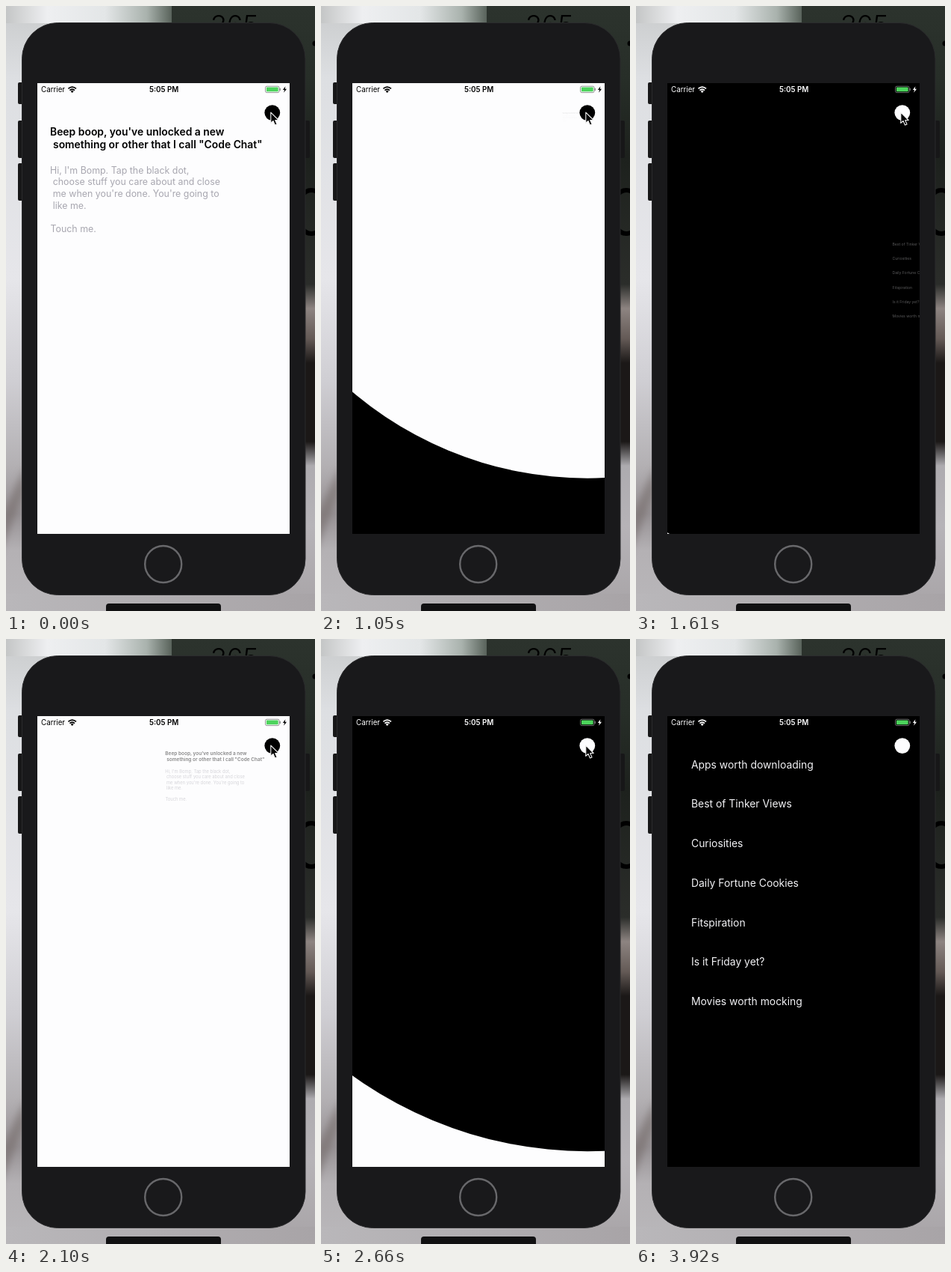
An HTML page that plays this animation: 414 px wide and 808 px high, repeating every 3.99 s.

```html
<!DOCTYPE html>
<html lang="en">
<head>
<meta charset="utf-8">
<title>Menu reveal</title>
<style>
  html, body { margin: 0; width: 100%; height: 100%; overflow: hidden; background: #000; }
  svg { display: block; width: 414px; height: 808px; font-family: Inter, "Open Sans", sans-serif; }
  text { white-space: pre; }
  .title { font-size: 13.9px; font-weight: 600; fill: #000; }
  .body { font-size: 12.4px; fill: #a8a7b0; }
  .row { font-size: 13.9px; fill: #f2f2f5; }
  .status { font-size: 9.8px; fill: currentColor; stroke: none; }
</style>
</head>
<body>
<svg viewBox="0 0 414 808" xmlns="http://www.w3.org/2000/svg">
  <defs>
    <linearGradient id="wallL" x2="0" y2="1">
      <stop offset="0" stop-color="#c9cbcc"/>
      <stop offset=".12" stop-color="#dddfe2"/>
      <stop offset=".45" stop-color="#e6e6ea"/>
      <stop offset=".62" stop-color="#cfced3"/>
      <stop offset=".76" stop-color="#b3b0b3"/>
      <stop offset=".84" stop-color="#979295"/>
      <stop offset=".9" stop-color="#b4b1b4"/>
      <stop offset="1" stop-color="#b9b7ba"/>
    </linearGradient>
    <linearGradient id="wallR" x2="0" y2="1">
      <stop offset="0" stop-color="#2c332d"/>
      <stop offset=".12" stop-color="#272e28"/>
      <stop offset=".25" stop-color="#1d211d"/>
      <stop offset=".46" stop-color="#2b2d2a"/>
      <stop offset=".5" stop-color="#8d8481"/>
      <stop offset=".55" stop-color="#645a56"/>
      <stop offset=".59" stop-color="#1b1817"/>
      <stop offset=".72" stop-color="#1b1817"/>
      <stop offset=".76" stop-color="#adabaf"/>
      <stop offset=".86" stop-color="#b6b3b7"/>
      <stop offset="1" stop-color="#a8a4a7"/>
    </linearGradient>
    <linearGradient id="glow">
      <stop offset="0" stop-color="#c4c6c6"/>
      <stop offset=".25" stop-color="#eeeff1"/>
      <stop offset=".6" stop-color="#e3e6e7"/>
      <stop offset=".85" stop-color="#a9b2ad"/>
      <stop offset="1" stop-color="#59635b"/>
    </linearGradient>
    <linearGradient id="floor">
      <stop offset="0" stop-color="#b9b7ba"/>
      <stop offset="1" stop-color="#a8a4a7"/>
    </linearGradient>
    <filter id="soft"><feGaussianBlur stdDeviation="5"/></filter>
    <clipPath id="glass"><rect x="42" y="103" width="338" height="602"/></clipPath>
    <clipPath id="hole"><circle id="ring" cx="357" cy="143" r="0"/></clipPath>
  </defs>

  <rect width="230" height="808" fill="url(#wallL)"/>
  <rect x="222" width="192" height="808" fill="url(#wallR)"/>
  <rect width="222" height="23" fill="url(#glow)"/>
  <rect y="785" width="414" height="23" fill="url(#floor)"/>
  <path d="M-10 690 L25 615 V650 L-10 735Z" fill="#756c6b" opacity=".6" filter="url(#soft)"/>
  <text x="274" y="38" font-size="36" font-weight="300">365</text>
  <circle cx="414" cy="50" r="3.5"/>
  <ellipse cx="409" cy="275" rx="19" ry="29" fill="none" stroke="#000" stroke-width="6"/>
  <rect x="134" y="798" width="154" height="20" rx="4" fill="#111112"/>

  <g fill="#171718">
    <rect x="16" y="102" width="8" height="29" rx="2"/>
    <rect x="16" y="153" width="8" height="50" rx="2"/>
    <rect x="16" y="210" width="8" height="50" rx="2"/>
    <rect x="399" y="153" width="8" height="50" rx="2"/>
    <rect x="21.5" y="22.5" width="379.5" height="764" rx="48" fill="#19191b" stroke="#2b2b2d"/>
  </g>
  <circle cx="210.7" cy="745.5" r="24.5" fill="none" stroke="#68686b" stroke-width="2.4"/>

  <g id="screen" clip-path="url(#glass)">
    <g id="page"><rect x="42" y="103" width="338" height="602" fill="#fdfdfe"/><g></g></g>
    <g id="menu"><rect x="42" y="103" width="338" height="602"/><g></g></g>
  </g>

  <g id="bar" fill="none" stroke="currentColor">
    <text class="status" x="47" y="115">Carrier</text>
    <text class="status" x="192" y="115" font-weight="600">5:05 PM</text>
    <path d="M83.4 110.4 Q88.7 105.8 94 110.4 M85.4 112.7 Q88.7 109.8 92 112.7" stroke-width="1.7"/>
    <path d="M88.7 116 l-2 -2.1 q2 -1.6 4 0z" fill="currentColor" stroke="none"/>
    <rect x="347.5" y="107.2" width="18.6" height="8.4" rx="2" stroke-width=".8" opacity=".5"/>
    <rect x="348.9" y="108.6" width="15.8" height="5.6" rx=".8" fill="#4cd45c" stroke="none"/>
    <path d="M367.2 109.8 v3.2" stroke-width="1.2" opacity=".5"/>
    <path d="M374.4 107.2 L370.9 112 H373.1 L372.2 115.8 L376 110.7 H373.7Z" fill="currentColor" stroke="none"/>
    <circle cx="356.8" cy="142.6" r="10.4" fill="currentColor" stroke="none"/>
  </g>
  <path id="cursor" d="M354.8 142.2 V156.4 L358 153.4 L360.4 159 L363 157.9 L360.7 152.5 H365.2Z"
        fill="#000" stroke="#f4f4f4" stroke-width="1.1" stroke-linejoin="round"/>
</svg>

<script>
const LOOP = 3990, STEP = 70;
const CIRCLE = { time: 280, radius: 663 };
const CONTENT = { delay: 59, time: 420 };
const CURSOR_GONE = 2730;
const TAPS = [48, 914, 1379, 1840, 2500];   // open, close, open, ...

const $ = id => document.getElementById(id);
const stage = $("screen"), ring = $("ring"), bar = $("bar"), cursor = $("cursor");

function addText(parent, cls, x, y, str) {
  const el = document.createElementNS("http://www.w3.org/2000/svg", "text");
  el.setAttribute("class", cls);
  el.setAttribute("x", x);
  el.setAttribute("y", y);
  el.textContent = str;
  return parent.appendChild(el);
}

// Each view's content grows out of its own fixed point.
const view = (id, px, py) => ({ root: $(id), content: $(id).lastElementChild, px, py });
const page = view("page", 349, 140);
const menu = view("menu", 499, 374);

["Beep boop, you've unlocked a new", "something or other that I call \"Code Chat\""]
  .forEach((s, i) => addText(page.content, "title", 59 + 4 * i, 172.6 + 17.5 * i, s));
["Hi, I'm Bomp. Tap the black dot,", "choose stuff you care about and close",
 "me when you're done. You're going to", "like me.", "", "Touch me."]
  .forEach((s, i) => addText(page.content, "body", i % 5 ? 62.7 : 59, 223.7 + 15.7 * i, s));
page.content.lastElementChild.setAttribute("x", 59.5);

const rows = ["Apps worth downloading", "Best of Tinker Views", "Curiosities", "Daily Fortune Cookies",
  "Fitspiration", "Is it Friday yet?", "Movies worth mocking"]
  .map((s, i) => addText(menu.content, "row", 74, 172.6 + 52.75 * i, s));

const clamp = u => Math.min(1, Math.max(0, u));
const easeOut = u => 1 - (1 - u) ** 2;
const easeInOut = u => u * u * (3 - 2 * u);

function pose(v, s) {
  v.content.setAttribute("transform",
    `translate(${v.px} ${v.py}) scale(${Math.max(s, 0.001)}) translate(${-v.px} ${-v.py})`);
  v.content.setAttribute("opacity", s);
}

function draw(t) {
  const count = TAPS.filter(tap => tap <= t).length;
  const dt = count ? t - TAPS[count - 1] : LOOP;
  const isMenu = count % 2 === 1;
  const [front, back] = isMenu ? [menu, page] : [page, menu];
  const grown = easeInOut(clamp((dt - CONTENT.delay) / CONTENT.time));

  if (stage.lastElementChild !== front.root) stage.append(front.root);
  back.root.removeAttribute("clip-path");
  front.root.setAttribute("clip-path", "url(#hole)");
  ring.setAttribute("r", CIRCLE.radius * easeOut(clamp(dt / CIRCLE.time)));
  pose(front, grown);
  pose(back, 1);
  rows[0].style.visibility = isMenu && grown < 0.45 ? "hidden" : "visible";

  bar.style.color = isMenu ? "#fdfdfe" : "#000";
  cursor.style.visibility = t < CURSOR_GONE ? "visible" : "hidden";
}

const start = performance.now();
function tick() {
  const t = (performance.now() - start) % LOOP;
  draw(Math.floor(t / STEP) * STEP);
  requestAnimationFrame(tick);
}
draw(0);
tick();
</script>
</body>
</html>
```
